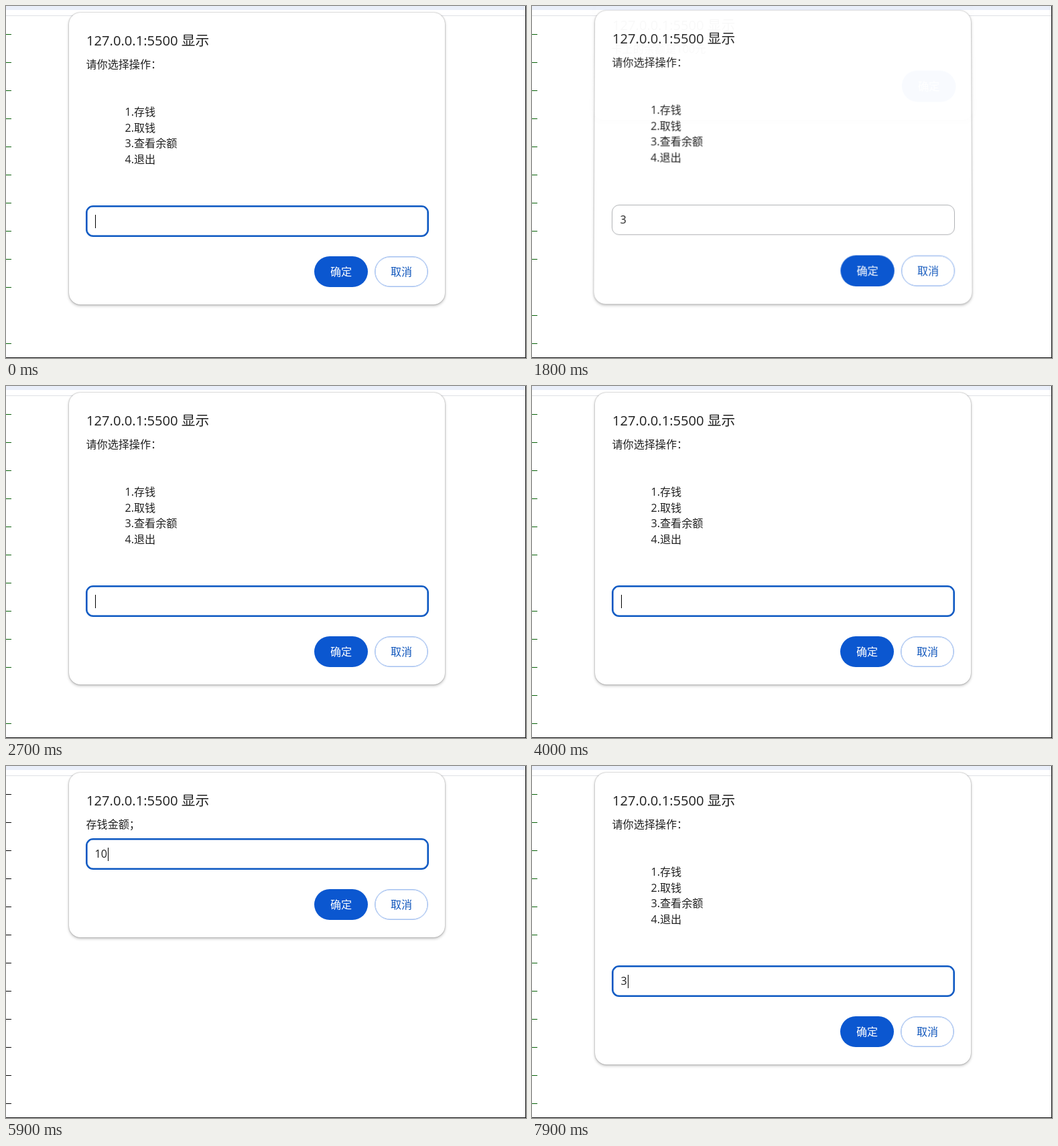
Write an HTML page that moves like this. It is 776 px wide and 526 px high and loops after 8 s.

```html
<!DOCTYPE html>
<html lang="zh-CN">
<head>
<meta charset="utf-8">
<style>
html, body { margin: 0; width: 100%; height: 100%; overflow: hidden; background: #fff; }
#stage { position: relative; width: 776px; height: 526px; overflow: hidden;
  font: 16.1px/23.7px "Open Sans", "Noto Sans CJK SC", "Noto Sans CJK", sans-serif; color: #1f1f1f; }
#stage div { position: absolute; box-sizing: border-box; white-space: pre; }
#strip { width: 776px; height: 6px; background: #e9eef9; }
#rule { top: 14px; width: 776px; height: 1px; background: #dfe1e6; }
#edge { inset: 0; border: solid #111; border-width: 0 1px 1px 0; }
.tick { width: 8px; height: 1px; }
#stage .dialog { left: 94px; top: 10px; width: 561px; background: #fff; border-radius: 17px;
  box-shadow: 0 0 2px rgba(0,0,0,.36), 0 2px 4px rgba(0,0,0,.26); transform-origin: 281px 41px; }
.title { left: 26px; top: 25.5px; font-size: 20.15px; line-height: 30px; }
.title span { font-size: 20.7px; }
.text { left: 25.5px; top: 66px; }
.list { left: 83.5px; top: 137px; }
.field { left: 25px; width: 512px; height: 47px; border: 2px solid #0b57c2; border-radius: 11px;
  box-shadow: inset 0 0 0 .6px #0b57c2; }
.blur .field { margin: 1px; width: 510px; height: 45px; border: 1px solid #b0b2b5; box-shadow: none; }
.value { left: 38.5px; }
.caret { width: 1px; height: 20px; background: #000; }
.btn { width: 80px; height: 46px; border-radius: 23px; text-align: center; line-height: 46px; font-weight: 500; }
.ok { background: #0b57d0; color: #fff; }
.blur .solo { background: #1052bd; }
.cancel { left: 456px; border: 1px solid #a3c0f0; box-shadow: inset 0 0 0 .5px #a3c0f0; line-height: 44px; color: #1459bd; }
</style>
</head>
<body>
<div id="stage">
  <div id="strip"></div><div id="rule"></div><div id="edge"></div>
</div>
<script>
const stage = document.getElementById('stage');

function add(parent, cls, css = '', html = '') {
  const el = document.createElement('div');
  el.className = cls;
  el.style.cssText = css;
  el.innerHTML = html;
  return parent.appendChild(el);
}

const ticks = Array.from({ length: 12 }, (_, i) => add(stage, 'tick', `top:${42 * (i + 1)}px`));

// fieldY: top of the input inside the dialog; absent for a plain alert
function dialog(height, text, fieldY, list = '') {
  const el = add(stage, 'dialog', `height:${height}px`);
  add(el, 'title', '', '127.0.0.1:5500 <span>显示</span>');
  add(el, 'text', '', text);
  add(el, 'list', '', list);
  const hasField = fieldY !== undefined;
  const btnY = height - 71.5;
  add(el, hasField ? 'btn ok' : 'btn ok solo', `left:${hasField ? 366 : 456}px;top:${btnY}px`, '确定');
  if (!hasField) return { el };
  add(el, 'btn cancel', `top:${btnY}px`, '取消');
  add(el, 'field', `top:${fieldY}px`);
  return {
    el,
    value: add(el, 'value', `top:${fieldY + 12}px`),
    caret: add(el, 'caret', `top:${fieldY + 14}px`)
  };
}

const menu = dialog(435.5, '请你选择操作：', 288, '1.存钱\n2.取钱\n3.查看余额\n4.退出');
const balance = dialog(180.5, '卡上的余额是100元');
const deposit = dialog(245.5, '存钱金额；', 98);
const dialogs = [menu, balance, deposit];

const LOOP = 8000, STEP = 100, FADE = 200;
const sessions = [
  { box: menu, open: -1000, close: 1800, keys: [[0, ''], [1400, '3']] },
  { box: balance, open: 1800, close: 2500 },
  { box: menu, open: 2500, close: 4700, keys: [[2600, ''], [4200, '1']] },
  { box: deposit, open: 4700, close: 6500, keys: [[4700, ''], [5500, '1'], [5900, '10'], [6100, '100']] },
  { box: menu, open: 6500, close: 9000, keys: [[6600, ''], [7800, '3']] }
];

// time and position of the unlit tick (0: all lit)
const gaps = [[0, 462], [300, 504], [600, 126], [1000, 42], [1100, 420], [1900, 0], [2600, 462],
  [3200, 504], [3300, 210], [3700, 378], [4000, 294], [4200, 462], [4300, 0], [5500, 252], [5600, 210], [5700, 0]];

const latest = (list, t) => list.filter(e => e[0] <= t).pop() || list[0];

function show({ box, open, close, keys }, t, order) {
  const blur = t >= close - (keys ? 100 : 200);
  let tilt, alpha;
  if (t >= close) {
    const q = (t - close) / FADE;
    tilt = 0.13 + 0.87 * q;
    alpha = 1 - 1.7 * q;
  } else {
    tilt = (1 - Math.min(1, (t - open) / FADE)) ** 3;
    alpha = 1 - 0.965 * tilt;
  }
  const s = box.el.style;
  s.display = 'block';
  s.zIndex = order;
  s.opacity = alpha;
  s.transform = tilt
    ? `translateY(${-23 * tilt}px) matrix3d(1,0,0,0,0,1,0,${-0.00011 * tilt},0,0,1,0,0,0,0,1)`
    : 'none';
  box.el.classList.toggle('blur', blur);
  if (!keys) return;
  const [since, text] = latest(keys, t);
  const lit = Math.floor(Math.max(0, t - since) / 500) % 2 === 0;
  box.value.textContent = text;
  box.caret.style.left = Math.round(39.4 + 9.1 * text.length) + 'px';
  box.caret.style.visibility = lit && !blur ? 'visible' : 'hidden';
}

function draw(now) {
  const t = Math.floor(now % LOOP / STEP) * STEP;
  const gap = latest(gaps, t)[1];
  ticks.forEach((el, i) => {
    el.style.background = t >= 4900 && t < 6500 ? '#000' : '#056105';
    el.style.visibility = 42 * (i + 1) === gap ? 'hidden' : 'visible';
  });
  for (const d of dialogs) d.el.style.display = 'none';
  sessions.forEach((s, i) => {
    if (t >= s.open && t < s.close + FADE) show(s, t, i + 1);
  });
}

const start = performance.now();
function frame() {
  draw(performance.now() - start);
  requestAnimationFrame(frame);
}
frame();
</script>
</body>
</html>
```
